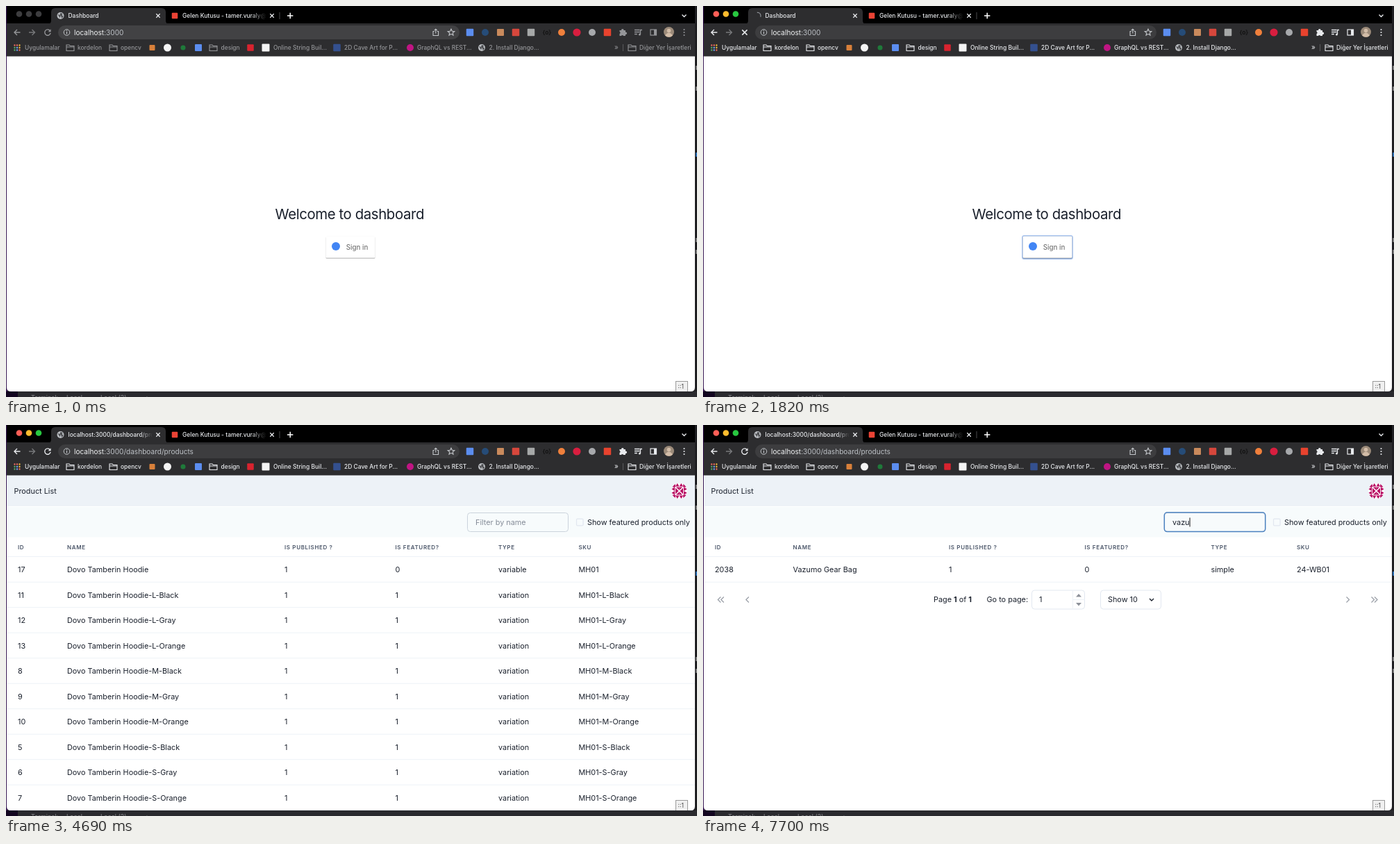
Write an HTML page that moves like this. It is 995 by 563 pixels and loops after 8 s.

```html
<!DOCTYPE html>
<html lang="en">
<head>
<meta charset="utf-8">
<title>Product dashboard</title>
<style>
  html, body { margin: 0; width: 100%; height: 100%; overflow: hidden; background: #1e1e21; }
  svg { display: block; font-family: Inter, sans-serif; white-space: pre; }
  .title { letter-spacing: -.02em; }
  .th { font-weight: 600; letter-spacing: .08em; }
  .tab { font-weight: 500; }
</style>
</head>
<body>
<svg id="stage" width="995" height="563" viewBox="0 0 995 563"></svg>
<script>
const LOOP = 8000, STEP = 70;
const ACTIVATE = 70, CLICK = 1330, COMMIT = 2590, PAINT = 3080, LOADED = 3220, DATA = 3500, FOCUS = 4690;
const DARK = '#1a202c', BODY = 10.85, SMALL = 8.45;
const stage = document.getElementById('stage');

const TYPED = [[0, ''], [6160, 'v'], [6230, 'va'], [6300, 'vaz'], [6510, 'vazu'], [6580, 'vazumo'], [7140, 'vazum'], [7210, 'vazu']];
const CARET = [[0, false], [4760, true], [5320, false], [5810, true], [7000, false], [7140, true], [7210, false], [7700, true]];

const hoodie = 'Dovo Tamberin Hoodie';
const ALL = [['17', hoodie, 1, 0, 'variable', 'MH01']];
[['L', 11], ['M', 8], ['S', 5]].forEach(([size, first]) =>
  ['Black', 'Gray', 'Orange'].forEach((color, i) =>
    ALL.push([first + i, `${hoodie}-${size}-${color}`, 1, 1, 'variation', `MH01-${size}-${color}`])));
const BAGS = [
  [2038, 'Vazumo Gear Bag', 1, 0, 'simple', '24-WB01'],
  [2026, 'Vazerin Duffle', 1, 0, 'simple', '24-MB01']
];
const RESULTS = [[0, ALL], [6370, BAGS], [6510, BAGS.slice(0, 1)]];
const HEADS = ['ID', 'NAME', 'IS PUBLISHED ?', 'IS FEATURED?', 'TYPE', 'SKU'];
const WIDE = [17, 88, 401, 560.5, 709, 824.5], NARROW = [17, 129.5, 354, 549.5, 731.5, 855];

const valueAt = (keys, t) => keys.filter(k => k[0] <= t).pop()[1];
const progress = (t, start, length) => Math.min(1, Math.max(0, (t - start) / length));

const text = (x, y, s, size, fill, more = '') =>
  `<text x="${x}" y="${y + size * .36}" font-size="${size}" fill="${fill}" ${more}>${s}</text>`;
const rect = (x, y, w, h, fill, more = '') =>
  `<rect x="${x}" y="${y}" width="${w}" height="${h}" fill="${fill}" ${more}/>`;
const disc = (x, y, r, fill, more = '') => `<circle cx="${x}" cy="${y}" r="${r}" fill="${fill}" ${more}/>`;
const square = (x, y, size, fill) => rect(x - size / 2, y - size / 2, size, size, fill, 'rx="1"');
const line = (d, color, w = 1.3) => `<path d="${d}" fill="none" stroke="${color}" stroke-width="${w}"/>`;
const arc = (x, y, r, start, length, color, w) => disc(x, y, r, 'none',
  `stroke="${color}" stroke-width="${w}" pathLength="360" stroke-dasharray="${length} 360" transform="rotate(${start} ${x} ${y})"`);
const cross = (x, y, r, color, w) => line(`M${x - r} ${y - r}l${2 * r} ${2 * r}m0 ${-2 * r}l${-2 * r} ${2 * r}`, color, w);
const chevron = (x, y, dir, color) => line(`M${x - 2 * dir} ${y - 4}l${4 * dir} 4l${-4 * dir} 4`, color, 1.3);
const folder = (x, y, color) => line(`M${x} ${y - 4}h4l1.3 1.5h5.7v7h-11zM${x} ${y - 1}h11`, color, 1.1);
const globe = (x, y) => disc(x, y, 5, '#b9bcc0') +
  `<path d="M${x - 4} ${y - 2}l3 1 1 2 -1 2zM${x} ${y - 4}l3 1 -1 2 2 2 -2 3 -1 -3 -2 -2z" fill="#4a4b4e"/>`;

const DEFS = `<defs>${[['fade1', 193, 211], ['fade2', 352, 375]].map(([id, a, b]) =>
  `<linearGradient id="${id}" gradientUnits="userSpaceOnUse" x1="${a}" x2="${b}">
    <stop stop-color="#e8eaed"/><stop offset="1" stop-color="#e8eaed" stop-opacity="0"/></linearGradient>`).join('')}
  <clipPath id="round"><circle cx="969.5" cy="95" r="11.3"/></clipPath>
  <clipPath id="window"><path d="M1 0H992V549q0 6-6 6H7q-6 0-6-6z"/></clipPath></defs>`;

function desktop() {
  const specks = [[89, '#777'], [119, '#777'], [214, '#2b6cb0'], [337, '#777'], [354, '#777']];
  return rect(0, 0, 995, 563, '#1e1e21') + rect(0, 0, 2, 563, '#3a1a55') + rect(0, 555, 17, 8, '#12051f') +
    rect(17, 555, 978, 8, '#2a2a2e') +
    text(36, 564, 'Terminal:', 9, '#8a8a8e') + text(87, 564, 'Local', 9, '#8a8a8e') +
    text(136, 564, 'Local (2)', 9, '#8a8a8e') + text(200, 564, '+  ⌄', 9, '#8a8a8e') +
    specks.map(([y, c]) => rect(993, y - 3, 2, 6, c)).join('');
}

function tabStrip(t, active) {
  const lights = active ? ['#fe5f57', '#febc2e', '#28c840'] : ['#3d3d3f', '#3d3d3f', '#3d3d3f'];
  const loading = t >= CLICK && t < LOADED;
  const title = t < COMMIT ? 'Dashboard' : 'localhost:3000/dashboard/products';
  const spinner = t < COMMIT
    ? arc(78.5, 14, 4.6, -(t - CLICK) * .2, 120, '#8d9196', 1.2)
    : arc(78.5, 14, 4.6, 40 + (t - 2800) * .23, 155, '#5878c2', 1.2);
  return rect(0, 0, 992, 26, '#000') +
    lights.map((c, i) => disc(19 + 14 * i, 11.5, 4.3, c)).join('') +
    '<path d="M60 26q5 0 5-5V9q0-6 6-6H224q6 0 6 6V21q0 5 5 5z" fill="#2d2d2f"/>' +
    (loading ? spinner : globe(78.5, 14)) +
    text(89.5, 14, title, SMALL, 'url(#fade1)', 'class="tab"') + cross(219, 14, 2.7, '#e8eaed') +
    square(243, 14, 8.5, '#ea4335') +
    text(254, 14, 'Gelen Kutusu - tamer.vuraly@po', SMALL, 'url(#fade2)', 'class="tab"') +
    cross(383, 14, 2.7, '#e8eaed') + rect(393.5, 9, 1, 10, '#4a4a4c') +
    line('M405 14h8.4M409.2 9.8v8.4', '#fff', 1.5) + line('M973.5 12.5l3 3 3-3', '#e8eaed', 1.4);
}

function toolbar(t, active, ink) {
  const loading = t >= CLICK && t < LOADED;
  const committing = t >= COMMIT && t < PAINT;
  const path = t < COMMIT ? ':3000' : ':3000/dashboard/products';
  const reload = line('M63.4 35.6a4.2 4.2 0 1 0 .7 3.3', ink, 1.4) + `<path d="M64.6 33.2v4h-4z" fill="${ink}"/>`;
  return rect(0, 25, 992, 47.5, '#2d2d2f') +
    line('M20.5 38h-8.5m4-4l-4 4 4 4', ink, 1.4) + line('M33 38h8.5m-4-4l4 4-4 4', '#77787b', 1.4) +
    (loading ? cross(60, 38, 3.6, ink, 1.5) : reload) +
    rect(75, 28, 578, 20, active ? '#3d3d3f' : '#424244', 'rx="10"') +
    line('M87.5 37v3.5M87.5 34.8v1.3', '#c4c7cb', 1.1) + disc(87.5, 38, 4.3, 'none', 'stroke="#c4c7cb"') +
    text(98, 38, `localhost<tspan fill="#bdc1c6">${path}</tspan>`, 10.1, '#f1f3f4') +
    line('M616.8 36.5h-1.8v6h7.6v-6h-1.8M618.8 39.5v-6.3m-2 2l2-2 2 2', '#c4c7cb', 1.1) +
    line('M641 33.2l1.4 3.1 3.4.3-2.6 2.2.8 3.3-3-1.8-3 1.8.8-3.3-2.6-2.2 3.4-.3z', '#c4c7cb', 1.1) +
    square(668, 38, 10.5, '#5b8def') + disc(690, 38, 5, '#264c78') + square(712, 38, 10, '#c98a5c') +
    (committing ? disc(734, 38, 5, '#b4b6ba') : square(734, 38, 10.5, '#d6473c')) +
    square(756, 38, 10.5, '#a6a8a8') + text(772.5, 38, '{o}', 8.5, '#111', 'font-weight="600"') +
    disc(800, 38, 5, '#f0803c') + disc(822, 38, 5.6, '#d81e3f') + disc(844, 38, 5, '#a7a9ac') +
    square(866, 38, 10.5, '#e8432e') +
    `<path d="M883.5 35h2.7a1.7 1.7 0 1 1 3.3 0h2.5v2.7a1.7 1.7 0 1 1 0 3.3v2h-3a1.6 1.6 0 0 0-3 0h-2.5v-3a1.6 1.6 0 0 0 0-3z" fill="${ink}"/>` +
    line('M905 34.5h7.5M905 37.5h7.5M905 40.5h4M913.5 41v-6.5h2.5', ink, 1.3) + disc(912.4, 41, 1.5, ink) +
    rect(928, 34, 8.5, 8, 'none', `stroke="${ink}" stroke-width="1.2"`) + rect(933, 34, 3.5, 8, ink) +
    disc(954.5, 37.5, 7.5, '#9b8a79') + disc(954.5, 35.5, 2.8, '#d3bda8') +
    '<path d="M949 42.5q5.5-8 11 0q-5 4.5-11 0z" fill="#d3bda8"/>' +
    [34, 38, 42].map(y => disc(976.5, y, 1.05, ink)).join('');
}

function bookmarks(ink) {
  const label = (x, s) => text(x, 60, s, SMALL, ink, 'class="tab"');
  const dots = ['#ea6a5e', '#ea6a5e', '#f0b93a', '#57a865', '#6d9eeb', '#f0b93a', '#57a865', '#6d9eeb', '#ea6a5e'];
  return dots.map((c, i) => square(12.5 + i % 3 * 3.5, 56.5 + Math.floor(i / 3) * 3.5, 2.3, c)).join('') +
    label(27, 'Uygulamalar') + folder(87, 60, ink) + label(103, 'kordelon') + folder(149, 60, ink) + label(165, 'opencv') +
    square(210.5, 60, 8, '#d9803a') + disc(232.5, 60, 5.5, '#f4f4f4') + disc(255, 60, 3.5, '#1f7a3a') +
    square(277, 60, 10, '#5b8def') + folder(293, 60, ink) + label(309.5, 'design') + square(352, 60, 9.5, '#d8232f') +
    square(374, 60, 11, '#f4f4f4') + label(385, 'Online String Buil...') +
    square(476.5, 60, 10.5, '#34508f') + label(487, '2D Cave Art for P...') +
    disc(582, 60, 5, '#c01583') + label(592, 'GraphQL vs REST...') + globe(685, 60) + label(695.5, '2. Install Django...') +
    text(876, 59.5, '»', 10, ink) + rect(888, 55, 1, 10, '#5a5a5c') + folder(896, 60, ink) + label(912, 'Diğer Yer İşaretleri');
}

function welcome(t, active) {
  const ring = progress(t, CLICK, 210);
  return text(387.5, 299.5, 'Welcome to dashboard', 20.4, DARK, 'class="title"') +
    rect(460, 331, 72, 33, 'none', `rx="2.5" stroke="#a9c4ee" stroke-width="2" opacity="${ring}"`) +
    rect(460.5, 332.5, 71, 31.5, '#000', 'rx="1.5" opacity=".2"') +
    rect(460.5, 331.5, 71, 31, '#fff', `rx="1.5" stroke="#000" stroke-opacity="${active ? .07 : .02}" stroke-width=".8"`) +
    disc(475, 346, 6, '#4285f4') + text(489.8, 347.5, 'Sign in', 9.75, '#757575', 'class="tab"');
}

function avatar() {
  const quarter = '<path d="M1 0L5.6-4.6V0zM0-1L4.6-5.6H0zM0-6.5H5.6L2.8-11.3zM6.5 0L11.3-2.8L6.5-5.6zM5.6-5.6H11.3L5.6-11.3z"/>';
  return '<g clip-path="url(#round)">' + rect(958, 83, 24, 24, '#fff') +
    '<g transform="translate(969.5 95)" fill="#b80d63">' +
    [0, 90, 180, 270].map(a => `<g transform="rotate(${a})">${quarter}</g>`).join('') + '</g></g>';
}

function filterBar(t) {
  const value = valueAt(TYPED, t), focus = progress(t, FOCUS, 210);
  return rect(1, 118, 991, 43.5, '#f7fbfc') +
    rect(664.5, 126.5, 145, 27, 'none', 'rx="4" stroke="#cbd3dc"') +
    rect(664.3, 126, 145.4, 27.6, 'none', `rx="4" stroke="#4a80bf" stroke-width="1.5" opacity="${focus}"`) +
    (value ? '' : text(676, 140, 'Filter by name', BODY, '#858c98')) +
    text(676, 140, value, BODY, DARK, 'id="value"') +
    (valueAt(CARET, t) ? rect(676, 133.5, 1, 13, '#111', 'id="caret"') : '') +
    rect(821.5, 135.2, 9.6, 9.6, 'none', 'rx="1.4" stroke="#e2e8f0" stroke-width="1.3"') +
    text(837, 140, 'Show featured products only', BODY, DARK);
}

function pager(y) {
  const gray = '#9ba0a8', box = (x, w) => rect(x + .5, y - 13.5, w, 27, '#fff', 'rx="4" stroke="#e2e8f0"');
  const bold = '<tspan font-weight="700">1</tspan>';
  return chevron(23.5, y, -1, gray) + chevron(28, y, -1, gray) + chevron(64, y, -1, gray) +
    text(332, y, `Page ${bold} of ${bold}`, BODY, DARK) + text(408.5, y, 'Go to page:', BODY, DARK) +
    box(473, 76) + text(484, y, '1', BODY, DARK) + line(`M532.5 ${y - 13}v26M532.5 ${y}h17`, '#edf2f7', 1) +
    `<path d="M537 ${y - 4}h8l-4-4.5zM537 ${y + 4.5}h8l-4 4.5z" fill="#8d9199"/>` +
    box(572, 87) + text(583, y, 'Show 10', BODY, DARK) + line(`M643 ${y - 1.5}l3 3 3-3`, DARK, 1.4) +
    chevron(928.5, y, 1, gray) + chevron(964.5, y, 1, gray) + chevron(969, y, 1, gray);
}

function table(t) {
  const rows = valueAt(RESULTS, t), all = rows === ALL, xs = all ? WIDE : NARROW;
  const rule = y => rect(1, y, 991, 1, '#edf2f7');
  return HEADS.map((h, i) => text(xs[i], 176, h, 8, '#4a5568', 'class="th"')).join('') + rule(189) +
    rows.map((row, r) => row.map((cell, i) => text(xs[i], 208.3 + 36.5 * r, cell, BODY, DARK)).join('') +
      rule(225.7 + 36.5 * r)).join('') +
    (all ? '' : pager(215 + 36.5 * rows.length));
}

function products(t) {
  const spin = arc(496, 189, 15, -105 + (t - 3290) * .3, 175 + (t - 3290) * .15, '#3f7dcc', 3);
  return rect(1, 72.5, 991, 44.5, '#edf2f7') + text(11.5, 95.5, 'Product List', BODY, DARK) + avatar() +
    (t < DATA ? disc(496, 189, 15, 'none', 'stroke="#e2e8f0" stroke-width="3"') + spin : filterBar(t) + table(t));
}

function scene(t) {
  const active = t >= ACTIVATE, ink = active ? '#e8eaed' : '#949598';
  return DEFS + desktop() + '<g clip-path="url(#window)">' + rect(1, 72, 991, 483, '#fff') +
    (t < PAINT ? welcome(t, active) : products(t)) +
    rect(964.5, 540.5, 17, 16, '#f0f0f0', 'stroke="#9a9a9a"') + text(967.5, 548, '::1', 8.5, '#444') +
    tabStrip(t, active) + toolbar(t, active, ink) + bookmarks(ink) + '</g>';
}

let shown = -1;
function frame(now) {
  const t = Math.floor(now % LOOP / STEP) * STEP;
  if (t !== shown) {
    stage.innerHTML = scene(t);
    const caret = document.getElementById('caret');
    if (caret) caret.setAttribute('x', 676 + document.getElementById('value').getComputedTextLength());
    shown = t;
  }
  requestAnimationFrame(frame);
}
requestAnimationFrame(frame);
</script>
</body>
</html>
```
